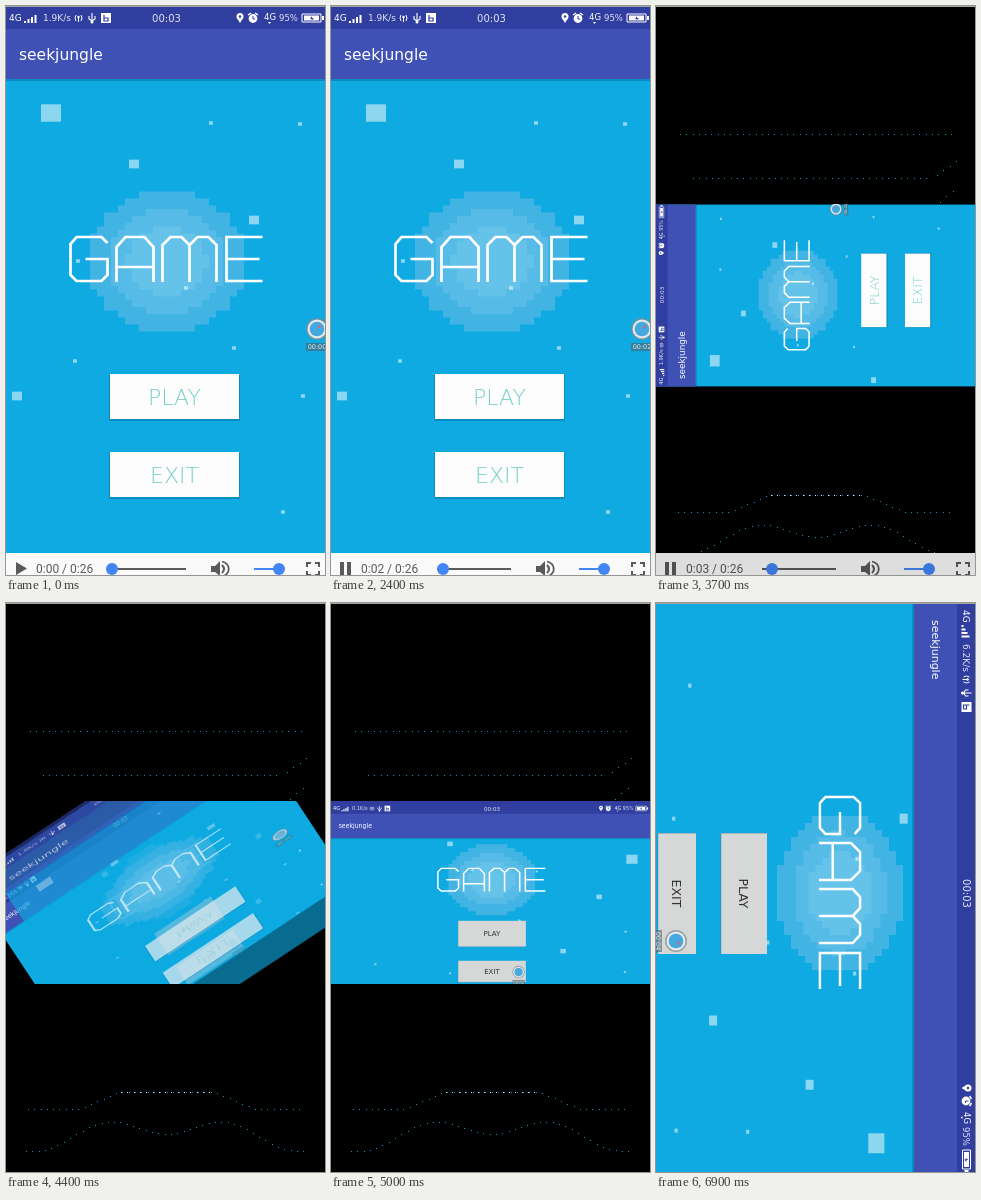
These frames come from a looping animation (319 by 569 pixels, 8 s). An HTML page with a canvas:

```html
<!DOCTYPE html>
<html lang="en">
<head>
<meta charset="utf-8">
<title>Game screen rotation</title>
<style>
html, body { margin: 0; width: 100%; height: 100%; overflow: hidden; background: #000; }
canvas { display: block; }
</style>
</head>
<body>
<canvas id="stage" width="319" height="569"></canvas>
<script>
const c = document.getElementById('stage').getContext('2d');
const LOOP = 8000;
const SKY = '#0eaae1', BAR = '#3f51b5', STATUS = '#303f9f', WHITE = '#fff';
const FONT = '"DejaVu Sans", sans-serif';
const TITLE = 'seekjungle';

const clamp = v => Math.min(1, Math.max(0, v));

function box(x, y, w, h, color) {
  c.fillStyle = color;
  c.fillRect(x, y, w, h);
}

function disc(x, y, r, color) {
  c.fillStyle = color;
  c.beginPath();
  c.arc(x, y, r, 0, Math.PI * 2);
  c.fill();
}

function path(d, color, width) {
  const p = new Path2D(d);
  if (width) {
    c.strokeStyle = color;
    c.lineWidth = width;
    c.stroke(p);
  } else {
    c.fillStyle = color;
    c.fill(p);
  }
}

// y is the middle of the capitals
function text(s, x, y, size, color, { align = 'left', weight = 400, font = FONT } = {}) {
  c.font = `${weight} ${size}px ${font}`;
  c.textAlign = align;
  c.fillStyle = color;
  c.fillText(s, x, y + size * 0.365);
}

function placed(fn, ...matrix) {
  c.save();
  c.transform(...matrix);
  fn();
  c.restore();
}

function pixelEllipse(x, y, rx, ry, color) {
  const step = 7;
  c.fillStyle = color;
  c.beginPath();
  for (let top = -ry; top < ry; top += step) {
    const mid = clamp(Math.abs((top + step / 2) / ry));
    const half = Math.round(rx * Math.sqrt(1 - mid * mid) / step) * step;
    c.rect(x - half, y + top, half * 2, Math.min(step, ry - top));
  }
  c.fill();
}

function glow(x, y, rx, ry) {
  ['#42b4e4', '#56bce7', '#65c3ea'].forEach((color, i) => {
    const k = 1 - i / 4;
    pixelEllipse(x, y, rx * k, ry * k, color);
  });
}

function logo(x, y, height) {
  placed(() => {
    path('M38 7L32 1H7L1 8V39L7 45H32L38 39V23H16' +
      'M47 46V11L56 1H75L84 11V46M47 31H84' +
      'M93 46V9L101 1H112L120 9V46M120 9L128 1H139L147 9V46' +
      'M193 1H157V45H193M157 23H190', WHITE, 2.7);
  }, 1, 0, 0, height / 46, x, y);
}

// One large square, three medium ones, then specks
function squares() {
  const centres = [[45, 107], [128, 158], [248, 214], [11, 390], [205, 117], [294, 118],
    [72, 255], [180, 282], [228, 342], [69, 355], [297, 390], [277, 506]];
  centres.forEach(([x, y], i) => {
    const w = i < 1 ? 20 : i < 4 ? 10 : 4;
    const h = w * 0.87;
    box(x - w / 2, y - h / 2, w, h, 'rgba(255,255,255,.52)');
  });
}

function statusBar(left, mid, right, y, speed) {
  const soft = 'rgba(255,255,255,.85)';
  placed(() => {
    text('4G', 3, 0, 9, WHITE);
    for (let i = 0; i < 4; i++) box(18 + i * 3.5, 3 - i * 2, 2, 2 + i * 2, WHITE);
    text(speed, 37, 0, 9, soft);
    path('M70 -3Q68 0 70 3M75 -3Q77 0 75 3M72.5 -2V4', WHITE, 1);
    disc(72.5, -1, 1.2, WHITE);
    path('M86 -5V5M83 -2V1L86 3L89 1V-2', WHITE, 1.1);
    disc(86, 4, 1.5, WHITE);
    box(95, -5, 10, 10, WHITE);
    path('M98 -3V3H102V0H98', STATUS, 1.2);
  }, 1, 0, 0, 1, left, y);
  text('00:03', mid, y, 10, soft, { align: 'center' });
  placed(() => {
    disc(-84, -1.5, 3.5, WHITE);
    path('M-87 0L-84 5L-81 0Z', WHITE);
    disc(-84, -1.5, 1.2, STATUS);
    disc(-71, 0.5, 4.4, WHITE);
    path('M-76 -3L-73 -5M-66 -3L-69 -5', WHITE, 1.5);
    path('M-71 -2V1H-69', STATUS, 1);
    text('4G', -60, -1, 8.5, WHITE);
    path('M-56 4L-53 4L-54.5 6Z', WHITE);
    text('95%', -45, 0, 8.5, soft);
    path('M-22 -4H-3V4H-22Z', WHITE, 1);
    box(-20, -2.5, 15, 5, WHITE);
    box(-2, -2, 2, 4, WHITE);
    path('M-12 -2L-14 1H-12L-13 3L-10 0H-12Z', STATUS);
  }, 1, 0, 0, 1, right, y);
}

function recorder(x, y, label, red) {
  disc(x, y, 11, 'rgba(130,142,148,.75)');
  disc(x, y, 9.5, '#e3e8ea');
  disc(x, y, 7.3, '#45a8df');
  if (red) disc(x + 2.5, y - 2.5, 1.3, '#d9656f');
  box(x - 11, y + 14, 22, 8, 'rgba(80,95,105,.6)');
  text(label, x, y + 18, 6.5, '#e8eef0', { align: 'center' });
}

function bars(width, statusHeight, barHeight) {
  box(0, barHeight, width, 2, 'rgba(0,50,90,.25)');
  box(0, 0, width, barHeight, BAR);
  box(0, -8, width, statusHeight + 8, STATUS);
}

function portrait(seconds) {
  box(0, 0, 319, 573, SKY);
  glow(161, 255.5, 79, 70);
  squares();
  logo(63.5, 230, 46);
  for (const [name, y] of [['PLAY', 368], ['EXIT', 446]]) {
    box(103, y + 1, 131, 46, 'rgba(0,70,110,.3)');
    box(104, y, 129, 45, '#fdfdfd');
    text(name, 168.5, y + 23, 22, '#74cfc6', { align: 'center', weight: 200 });
  }
  bars(319, 23, 73);
  statusBar(0, 160.5, 318, 12, '1.9K/s');
  text(TITLE, 13, 48.5, 15.5, WHITE);
  recorder(311, 323, '00:0' + seconds, true);
}

function landscape(speed, red) {
  box(0, 0, 580, 322, SKY);
  glow(290, 135, 80, 63);
  placed(squares, 0, 0.804, -1.147, 0, 663, 62.5);
  logo(193, 114, 42);
  for (const [name, y, h] of [['PLAY', 208, 46], ['EXIT', 279, 38]]) {
    box(230, y, 121, h, '#d6d7d7');
    path(`M230.5 ${y}V${y + h}H351`, 'rgba(80,110,125,.35)', 1);
    text(name, 290.5, y + h / 2, 12.5, '#333', { align: 'center' });
  }
  bars(580, 18, 61);
  statusBar(4, 290.5, 569, 8.5, speed);
  text(TITLE, 17, 39, 11, WHITE);
  recorder(338, 299, '00:04', red);
}

function dots(from, to, curve, color = '#1296c8') {
  for (let x = from; x <= to; x += 6.3) {
    box(Math.round(x), Math.round(curve(x)), 1, 1, color);
  }
}

function surround() {
  const hill = x => 489 + 17 * clamp((Math.abs(x - 161) - 48) / 40);
  const wave = x => 523 + 8 * Math.cos((x - 40) * Math.PI / 60) + 21 * ((x - 160) / 140) ** 2;
  dots(24, 297, () => 128);
  dots(37, 276, () => 172);
  dots(281, 303, x => 169 - (x - 281) * 0.75);
  dots(284, 300, x => 196 - (x - 284) * 0.9);
  dots(22, 297, hill);
  dots(115, 208, hill, '#d5edf6');
  dots(20, 301, wave);
}

function controls(t, played, seconds) {
  const ink = '#5a5a5a', blue = '#4285f4';
  const knob = 106 + Math.floor(played * 3);
  box(0, 547, 319, 22, '#fafafa');
  if (t < 500) {
    path('M10 556L21 562.5L10 569Z', ink);
  } else {
    box(9, 556, 4, 13, ink);
    box(16, 556, 4, 13, ink);
  }
  text(`0:0${seconds} / 0:26`, 30, 563, 12, ink, { font: 'Roboto, sans-serif' });
  box(106, 562, 74, 2, ink);
  disc(knob, 563, 6, blue);
  path('M205 560H209L214 555V570L209 566H205Z', ink);
  path('M216 559Q220 563 216 567', ink, 2);
  path('M216 555.5C225 558 225 568 216 570.5', ink, 1.8);
  box(248, 562, 25, 2, blue);
  disc(273, 563, 6, blue);
  path('M301 561V557H305M309 557H313V561M301 565V569H305M309 569H313V565', ink, 2);
}

function clip(x, y, w, h) {
  c.beginPath();
  c.rect(x, y, w, h);
  c.clip();
}

// The old layout spins, stretches and fades out over the new one
function turning(t, seconds) {
  const p = clamp((t - 4270) / 730);
  const left = (1 - p) ** 5;
  c.save();
  clip(0, 198, 319, 183);
  c.translate(159.5, 289.5);
  c.rotate(-Math.PI / 2 * left);
  if (p > 0) {
    c.save();
    clip(-159.5, -91.5, 319, 183);
    const speed = t < 5200 ? '0.1K/s' : '6.2K/s';
    placed(() => landscape(speed, false), 0.5606, 0, 0, 0.563, -161.4, -88.8);
    c.restore();
  }
  c.globalAlpha = clamp(1 - p * 2);
  if (c.globalAlpha > 0) {
    const sx = 1 - 0.43 * left;
    const sy = 0.32 + 0.241 * left;
    placed(() => portrait(seconds), sx, 0, 0, sy, -159.5 * sx, -286.5 * sy);
  }
  c.restore();
}

function draw(t) {
  const played = Math.max(0, t - 450) / 950;
  const seconds = Math.min(3, Math.floor(played));
  box(0, 0, 319, 569, '#000');
  if (t < 2600) {
    portrait(seconds);
  } else if (t < 6600) {
    surround();
    turning(t, seconds);
  } else {
    placed(() => landscape('6.2K/s', true), 0, 1, -1, 0, 319, 0);
  }
  const fade = clamp((t - 3600) / 300) ** 2;
  if (fade < 1) {
    controls(t, played, seconds);
    box(0, 547, 319, 22, `rgba(0,0,0,${fade})`);
  }
  box(0, 0, 319, 1, '#a5a5a5');
}

function tick() {
  draw(performance.now() % LOOP);
  requestAnimationFrame(tick);
}
tick();
</script>
</body>
</html>
```
